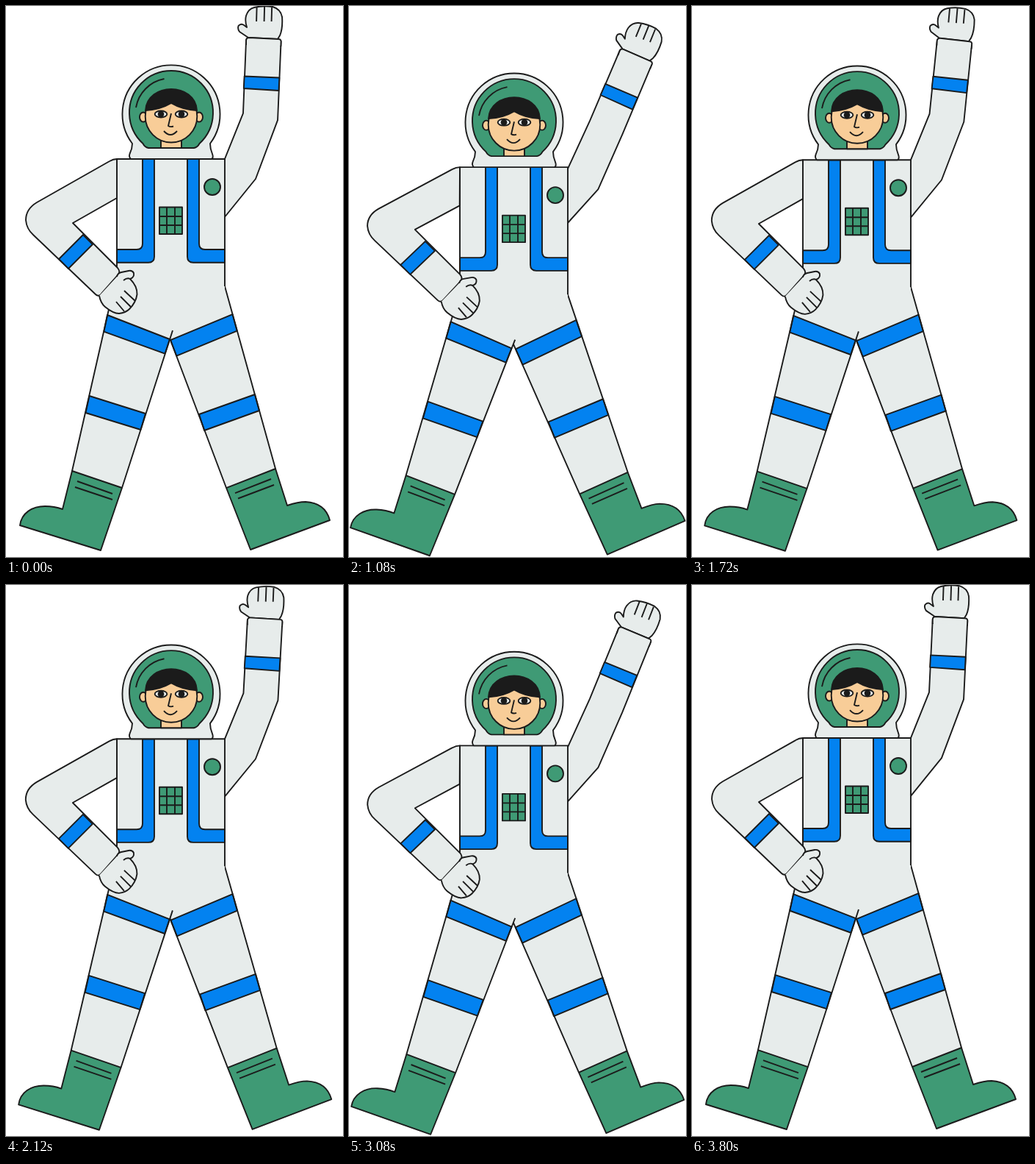
These frames come from a looping animation (459x749 px, 3.84 s). An HTML page with a canvas:

```html
<!DOCTYPE html>
<html lang="en">
<head>
<meta charset="utf-8">
<title>Waving astronaut</title>
<style>
  html, body { margin: 0; width: 100%; height: 100%; overflow: hidden; background: #fff; }
  canvas { display: block; }
</style>
</head>
<body>
<canvas id="stage" width="459" height="749"></canvas>
<script>
const ctx = document.getElementById('stage').getContext('2d');
const SUIT = '#e7eceb', BLUE = '#0382f0', GREEN = '#3f9a75', SKIN = '#f8cd98', INK = '#1b1b1b';
const CYCLE = 1920, STEP = 40, ARM_LAG = 65, LEG_LEAD = 25, BOB = 11.6, RAD = Math.PI / 180;

const wave = t => (1 - Math.cos(2 * Math.PI * t / CYCLE)) / 2;

function shape(d, fill, outline = true) {
  const path = new Path2D(d);
  if (fill) { ctx.fillStyle = fill; ctx.fill(path); }
  if (outline) ctx.stroke(path);
}

function ellipse(x, y, rx, ry, fill, outline = true) {
  ctx.beginPath();
  ctx.ellipse(x, y, rx, ry, 0, 0, 2 * Math.PI);
  ctx.fillStyle = fill;
  ctx.fill();
  if (outline) ctx.stroke();
}

// Draws a part with its own transform.
function part(setup, draw) {
  ctx.save();
  setup();
  draw();
  ctx.restore();
}

function rotate([x, y], [cx, cy], angle) {
  const c = Math.cos(angle), s = Math.sin(angle), dx = x - cx, dy = y - cy;
  return [cx + dx * c - dy * s, cy + dx * s + dy * c];
}

function leftLeg() {
  shape('M151 364L260 350L227 441L158 655L90 632Z', SUIT, false);
  shape('M138 420L223 453L216.5 472.7L133.3 442.7Z', BLUE);
  shape('M113.5 530L190 554L183.5 576L108.5 553Z', BLUE);
  shape('M151 364L90 632M227 441L158 655');
  shape('M90 632L158 655L129 740L19 706C21 689 36 680 53 680Q66 680 77 684Z', GREEN);
  shape('M97 646L145 663M94 654L145 671');
}

function rightLeg() {
  shape('M298 381L270 360L200 390L219 441L300 655L367 629Z', SUIT, false);
  shape('M308.5 419L224 454L232.3 475.7L314.7 441.6Z', BLUE);
  shape('M263 555L339 528L345 550L270 577Z', BLUE);
  shape('M298 381L367 629M219 441L300 655');
  shape('M300 655L367 629L383 679Q398 674 408 674C426 675 437 684 441 699L333 739Z', GREEN);
  shape('M312 662L361 643M316 669.5L365 651');
}

function torso() {
  shape('M151 208H298V384L280 400H165L151 360Z', SUIT, false);
  shape('M186 208V323Q186 331 178 331H151V348.7H194Q202 348.7 202 340.7V208Z', BLUE);
  shape('M263 208V323Q263 331 271 331H298V348.7H255Q247 348.7 247 340.7V208Z', BLUE);
  shape('M151 360V208H298V381');
  shape('M209 273.5H240V310H209Z', GREEN);
  shape('M219 273.5V310M230 273.5V310M209 286H240M209 298H240');
  ellipse(281, 246, 11, 11, GREEN);
}

function head() {
  shape('M170 208Q167 205 168.5 201Q172 194 172 187A66.5 66.5 0 1 1 278 187Q278 194 281 201Q283 206 280 208Z', SUIT);
  shape('M194 193Q189 192 186.5 187A57 57 0 1 1 263.5 187Q261 192 256 193Z', GREEN);
  shape('M177 138A48 48 0 0 1 215.5 99');
  shape('M211 193V180H239V193Z', SKIN);
  ellipse(187, 151, 5, 6.5, SKIN);
  ellipse(263, 151, 5, 6.5, SKIN);
  ellipse(225, 150, 35.3, 35.5, SKIN);
  shape('M190 142C191 123 208 113 225 113C242 113 259 123 260 142Q240 141 225 132Q210 141 190 142Z', INK);
  for (const x of [211, 239]) {
    ellipse(x, 147, 8.3, 4.5, SUIT);
    ellipse(x, 147, 4.3, 4.5, INK, false);
  }
  shape('M225 146L221 163Q224 165 228 163.5M215 170Q224 180 233 170');
}

function leftArm() {
  shape('M151 208Q146 208 141 211L42 267Q27 276 27 291Q28 303 37 311L122 392Q126 396 130 391L153 365Q156 361 152 356L91 295L151 261Z', SUIT);
  shape('M105 311L118 324L85 357L72 344Z', BLUE);
  shape('M127 394Q129 404 135 409Q146 418 154 418Q163 417 168 412Q177 403 178.5 392Q179 381 169 371Q175 369 174 363Q172 359 167 360L157 362Q152 363 151 368', SUIT);
  shape('M169 371Q165 369 160 373M161 387L176 401M156 395L170 409M150 402L161 415');
}

function rightArm(p, lagged) {
  const shift = 12 * p, lean = 0.055 * p;
  const upper = pt => {
    const [x, y] = rotate(pt, [292, 224], lean);
    return [x, y + shift];
  };
  const rest = [346.5, 150.5], elbow = upper(rest);
  const angle = (2.2 + 21 * lagged) * RAD, turn = angle - 2.4 * RAD;
  const lower = pt => rotate(pt, rest, turn).map((v, i) => v + elbow[i] - rest[i]);
  const miter = (angle + 20 * RAD + lean) / 2;
  const kink = side => [elbow[0] + side * 24 * Math.cos(miter), elbow[1] + side * 24 * Math.sin(miter)];

  const outline = [
    upper([285, 240]), kink(-1), lower([327, 46]), lower([374.5, 48]),
    kink(1), upper([340, 235]), upper([284, 304])
  ];
  shape('M' + outline.map(pt => pt.join(' ')).join('L') + 'Z', SUIT);

  part(() => {
    ctx.translate(...elbow);
    ctx.rotate(turn);
    ctx.translate(-rest[0], -rest[1]);
  }, () => {
    shape('M324.6 95.5L372.3 97.5L371.5 115L323.8 112Z', BLUE);
    shape('M330 43L318 35Q315 31 316.5 27Q320 23 324 26L328 29Q325 20 327 13Q330 4 338 2Q350 -1 363 1Q374 4 376 15Q377 31 373 40L370 45Z', SUIT);
    shape('M341.5 2L341 21M352 1L351.5 21M362 2L361.5 21');
    shape('M327 52V47Q327 43 331 43L371 45Q375 45 374.5 49V54Z', SUIT, false);
    shape('M327 53V47Q327 43 331 43L371 45Q375 45 374.5 49L374.3 55');
  });
}

function frame(now) {
  const t = Math.floor(now / STEP) * STEP;
  const p = wave(t), lead = wave(t + LEG_LEAD);
  const bob = () => ctx.translate(0, BOB * p);

  ctx.fillStyle = '#fff';
  ctx.fillRect(0, 0, 459, 749);
  ctx.strokeStyle = INK;
  ctx.lineWidth = 1.9;
  ctx.lineJoin = 'round';

  rightArm(p, wave(t - ARM_LAG));
  part(() => ctx.transform(1, -0.056 * lead, 0.0587 * lead, 1, -23.5 * lead, 25.6 * lead), rightLeg);
  part(() => ctx.transform(1, 0.0415 * p, -0.0634 * p, 1 - 0.005 * p, 27.1 * p, 5.9 * p), leftLeg);
  part(bob, torso);
  part(bob, head);
  part(() => ctx.transform(1 + 0.0125 * p, 0.0156 * p, -0.0057 * p, 1 - 0.0158 * p, -0.7 * p, 12.5 * p), leftArm);
}

const start = performance.now();
function loop() {
  frame(performance.now() - start);
  requestAnimationFrame(loop);
}
loop();
</script>
</body>
</html>
```
